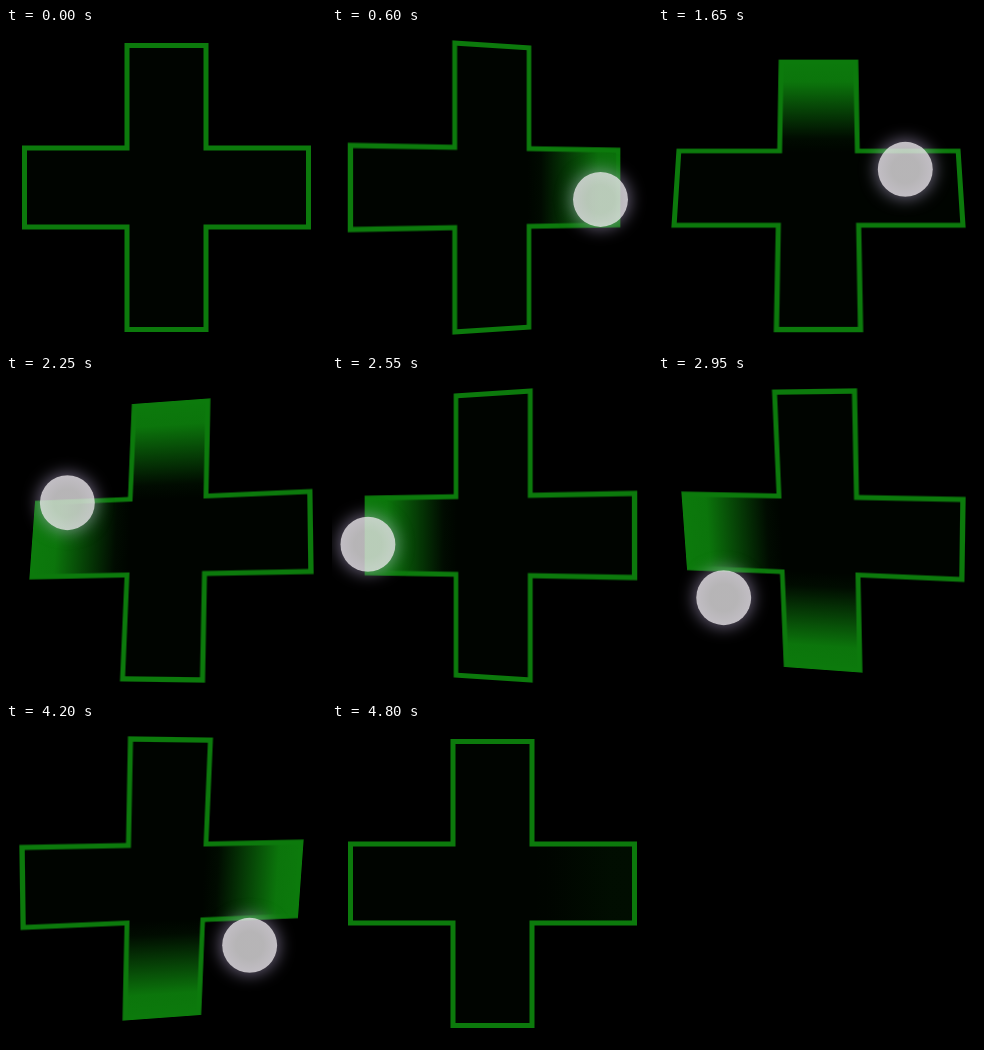
Recreate the animation shown at these times as an HTML page. Size 320 by 320 pixels, loop 5200 ms.

```html
<!DOCTYPE html>
<html lang="en">
<head>
<meta charset="utf-8">
<title>Tilting cross</title>
<style>
  html, body { margin: 0; width: 100%; height: 100%; overflow: hidden; background: #000; }
  .stage { position: relative; width: 320px; height: 320px; overflow: hidden; background: #000; }
  .cross { position: absolute; inset: 0; transform-origin: 160.5px 159.5px; }
  .ball {
    position: absolute; left: -27.5px; top: -27.5px; width: 55px; height: 55px;
    border-radius: 50%; opacity: 0;
    background: radial-gradient(circle, rgba(228, 226, 228, .8) 35%, rgba(236, 230, 240, .84) 85%, rgba(232, 222, 245, .88));
    box-shadow: 0 0 16px 2px rgba(205, 190, 235, .5);
  }
</style>
</head>
<body>
<div class="stage">
  <svg class="cross" width="320" height="320" viewBox="0 0 320 320">
    <defs>
      <linearGradient id="glow" x1="0" x2="1" y1="0" y2="0">
        <stop offset="0" stop-color="#0c7a0c" stop-opacity="0"/>
        <stop offset=".14" stop-color="#0c7a0c" stop-opacity=".06"/>
        <stop offset=".45" stop-color="#0c7a0c" stop-opacity=".52"/>
        <stop offset=".75" stop-color="#0c7a0c" stop-opacity=".96"/>
        <stop offset="1" stop-color="#0c7a0c"/>
      </linearGradient>
    </defs>
    <g transform="translate(160.5 159.5)">
      <path d="M-39.5-142h79v102.5H142v79H39.5V142h-79V39.5H-142v-79H-39.5z"
            fill="#000400" stroke="#0c7a0c" stroke-width="5"/>
      <g id="arms"></g>
    </g>
  </svg>
  <div class="ball"></div>
</div>
<script>
const LOOP = 5200, TILT = 20, SHIFT = 90, FADE = 140;

// Time and the side that is pressed back: x right, y down
const steps = [
  [0, 0, 0], [500, 1, 0], [1250, 1, -1], [1480, 0, -1], [1850, -1, -1], [2400, -1, 0],
  [2720, -1, 1], [3180, 0, 1], [3850, 1, 1], [4380, 1, 0], [4700, 0, 0]
];

// Time and centre of the ball
const path = [
  [500, 273, 178], [600, 268, 171], [1000, 273, 162], [1350, 274, 156], [1650, 247, 141],
  [1880, 168, 82], [2080, 92, 90], [2250, 61, 126], [2480, 38, 160], [2720, 38, 185],
  [2950, 65, 221], [3200, 132, 280], [3500, 160, 287], [3820, 178, 281],
  [4200, 243, 221], [4420, 268, 183], [4800, 273, 163]
];

const cross = document.querySelector('.cross');
const ball = document.querySelector('.ball');
const group = document.getElementById('arms');

const arms = [[1, 0], [0, 1], [-1, 0], [0, -1]].map(([x, y], i) => {
  const rect = document.createElementNS('http://www.w3.org/2000/svg', 'rect');
  const attrs = { x: 38, y: -42, width: 106.5, height: 84, fill: 'url(#glow)', transform: `rotate(${i * 90})` };
  for (const name in attrs) rect.setAttribute(name, attrs[name]);
  group.append(rect);
  return { rect, x, y };
});

const clamp = v => Math.max(0, Math.min(1, v));
const easeOut = v => 1 - (1 - v) ** 2;
const mix = (a, b, k) => a + (b - a) * k;

function unit([, x, y]) {
  const len = Math.hypot(x, y) || 1;
  return [x / len, y / len];
}

function ballAt(t) {
  const last = path.length - 1;
  let i = 0;
  while (i < last - 1 && t >= path[i + 1][0]) i++;
  const a = path[i], b = path[i + 1], span = b[0] - a[0];
  const k = clamp((t - a[0]) / span);
  const slope = (n, c) => {
    const p = path[Math.max(0, n - 1)], q = path[Math.min(last, n + 1)];
    return (q[c] - p[c]) / (q[0] - p[0]) * span;
  };
  return [1, 2].map(c =>
    mix(a[c], b[c], k * k * (3 - 2 * k)) +
    slope(i, c) * k * (1 - k) ** 2 - slope(i + 1, c) * k * k * (1 - k));
}

function draw(t) {
  let i = steps.length - 1;
  while (steps[i][0] > t) i--;
  const now = steps[i], before = steps[Math.max(0, i - 1)];
  const age = t - now[0];

  const k = easeOut(clamp(age / SHIFT));
  const from = unit(before), to = unit(now);
  const x = mix(from[0], to[0], k), y = mix(from[1], to[1], k);
  const size = Math.hypot(x, y);
  cross.style.transform = size < 0.001 ? 'none'
    : `perspective(800px) rotate3d(${-y}, ${x}, 0, ${TILT * size}deg)`;

  const f = easeOut(clamp(age / FADE));
  for (const arm of arms) {
    const lit = s => s[1] * arm.x + s[2] * arm.y > 0 ? 1 : 0;
    arm.rect.style.opacity = mix(lit(before), lit(now), f);
  }

  const [bx, by] = ballAt(t);
  ball.style.transform = `translate(${bx}px, ${by}px)`;
  ball.style.opacity = clamp((t - 480) / 80) * clamp((4800 - t) / 100);
}

function tick() {
  draw(performance.now() % LOOP);
  requestAnimationFrame(tick);
}
tick();
</script>
</body>
</html>
```
